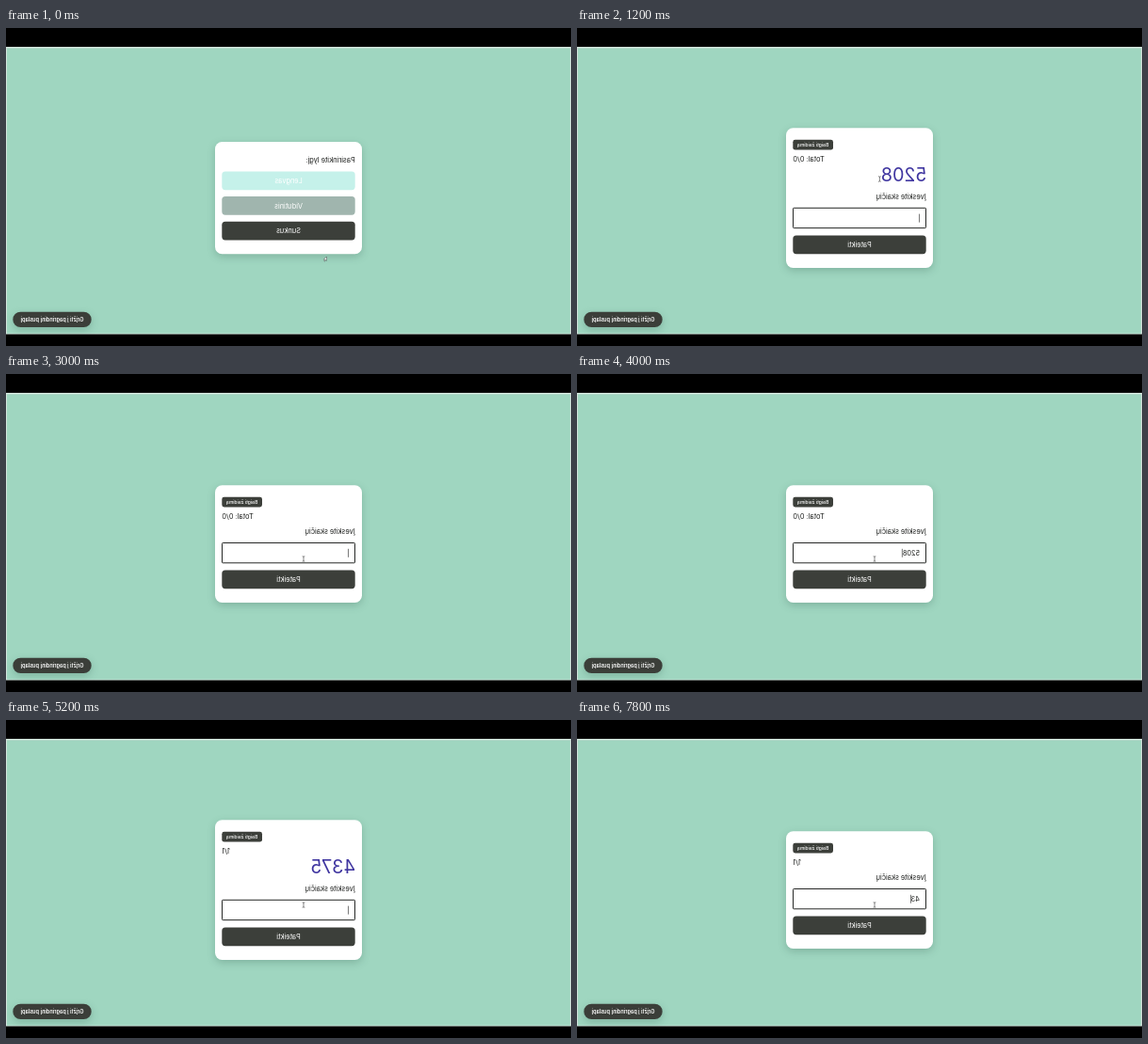
These frames come from a looping animation (600 by 338 pixels, 8 s). An HTML page:

```html
<!DOCTYPE html>
<html lang="lt">
<head>
<meta charset="utf-8">
<style>
html, body { margin: 0; width: 100%; height: 100%; overflow: hidden; background: #000; }
svg { display: block; width: 100%; height: 100%; }
text { font-family: Inter, Roboto, sans-serif; white-space: pre; }
.soft { filter: drop-shadow(0 3px 4px rgba(20, 60, 45, .22)); }
</style>
</head>
<body>
<svg viewBox="0 0 600 338">
  <rect width="600" height="338"/>
  <rect y="20" width="600" height="305.5" fill="#d3e5dd"/>
  <rect x="1" y="21.5" width="598" height="303.2" fill="#9fd6c0"/>
  <!-- the whole page is seen mirrored -->
  <g transform="translate(600 0) scale(-1 1)">
    <g class="soft"><rect x="509.3" y="301.7" width="83.4" height="16.4" rx="8.2" fill="#3b3e39"/></g>
    <text x="551" y="312" font-size="5.6" font-weight="600" fill="#fff" text-anchor="middle">Grįžti į pagrindinį puslapį</text>
    <g id="card"></g>
    <g id="cursor"></g>
  </g>
</svg>
<script>
const LOOP = 8000, STEP = 200;
const DARK = '#3c3f3a', INK = '#1c1e1c', LEFT = 229.3, WIDE = 141.4;
const cardEl = document.getElementById('card');
const cursorEl = document.getElementById('cursor');

const rect = (x, y, w, h, r, fill, extra = '') =>
  `<rect x="${x}" y="${y}" width="${w}" height="${h}" rx="${r}" fill="${fill}" ${extra}/>`;

const text = (x, y, str, o = {}) =>
  `<text x="${x}" y="${y}" font-size="${o.size || 7.4}" font-weight="${o.weight || 400}" ` +
  `fill="${o.fill || INK}" text-anchor="${o.anchor || 'start'}">${str}</text>`;

const panel = (top, bottom) =>
  `<g class="soft">${rect(222, top, 156, bottom - top, 7.5, '#fff')}</g>`;

const ring = y => rect(LEFT - .9, y - .9, WIDE + 1.8, 21.5, 4, 'none', 'stroke="#fff" stroke-width="1"') +
  rect(LEFT - 1.5, y - 1.5, WIDE + 3, 22.7, 4.5, 'none', 'stroke="#8fa39c" stroke-width=".7"');

const button = (y, label, fill = DARK) =>
  rect(LEFT, y, WIDE, 19.7, 3.6, fill) +
  text(300, y + 12.5, label, { fill: '#fff', anchor: 'middle' });

function mix(a, b, k) {
  return `rgb(${a.map((v, i) => Math.round(v + (b[i] - v) * k))})`;
}

function levels(t) {
  const hover = Math.min(1, Math.max(0, (t - 400) / 400));
  return panel(121, 240.3) +
    text(LEFT, 143, 'Pasirinkite lygį:') +
    button(152.5, 'Lengvas', mix([197, 241, 234], [172, 209, 200], hover)) +
    (t >= 1000 ? ring(152.5) : '') +
    button(179, 'Vidutinis', '#a0b5ae') +
    button(205.7, 'Sunkus');
}

const header = (y, score) =>
  rect(328, y, 42.7, 10.8, 2.4, DARK) +
  text(349.4, y + 7.2, 'Baigti žaidimą', { size: 5, weight: 500, fill: '#fff', anchor: 'middle' }) +
  text(370.6, y + 23, score, { anchor: 'end' });

function field(y, value, focus, caret) {
  const w = value.length * 4.62;
  return text(LEFT, y - 9, 'Įveskite skaičių') +
    rect(LEFT + .2, y + .3, WIDE - .4, 21.3, .8, '#fff',
      focus ? 'stroke="#262826" stroke-width="1"' : 'stroke="#a3a3ae" stroke-width=".8"') +
    text(236, y + 13.6, value) +
    (caret ? rect(236 + w, y + 6.6, .6, 9, 0, '#222') : '');
}

const memorize = (score, number, caret) =>
  panel(106.3, 255) + header(118.8, score) +
  text(LEFT - .6, 162.8, number, { size: 19.8, fill: '#3f35a0' }) +
  field(191, '', true, caret) + button(220.5, 'Pateikti');

const recall = (score, value, caret) =>
  panel(118.2, 243) + header(130.7, score) +
  field(179.2, value, true, caret) + button(208.5, 'Pateikti');

const result = () =>
  panel(109.8, 251.3) + header(122.2, '1/1') +
  field(170.7, '5208', false, false) +
  text(LEFT, 207.6, 'Correct!', { weight: 700, fill: '#bdeee3' }) +
  ring(217) + button(217, 'Kitas');

const blink = (t, start) => Math.floor((t - start) / 500) % 2 === 0;
const typed = (t, start, str) =>
  str.slice(0, Math.max(0, Math.floor((t - start) / STEP) + 1));

function scene(t) {
  if (t < 1200) return levels(t);
  if (t < 3000) return memorize('Total: 0/0', '5208', blink(t, 1100));
  if (t < 4400) return recall('Total: 0/0', typed(t, 3400, '5208'), true);
  if (t < 5000) return result();
  if (t < 7000) return memorize('1/1', '4375', blink(t, 5000));
  return recall('1/1', typed(t, 7600, '4375'), true);
}

const ease = k => { k = Math.min(1, Math.max(0, k)); return k * k * (3 - 2 * k); };

function cursor(t) {
  const up = ease(t / 800), down = ease((t - 1200) / 1000);
  const x = 260 + 18.6 * up + 5.4 * down;
  const y = 243.5 - 83 * up + 36 * down;
  const arrow = t < 600 || (t >= 4400 && t < 5000);
  const shape = arrow
    ? '<path d="M-.6-3.6V2.1L.8.9 1.8 3.1 2.8 2.6 1.9.5H3.5Z" transform="translate(0 3)" fill="#fff" stroke="#333" stroke-width=".6"/>'
    : '<path d="M-1.3-2.8Q0-2.8 0-2V2Q0 2.8-1.3 2.8M1.3-2.8Q0-2.8 0-2M0 2Q0 2.8 1.3 2.8" fill="none" stroke="#333" stroke-width=".6"/>';
  const size = t < 600 ? .75 : 1;
  return `<g transform="translate(${x} ${y}) scale(${size})">${shape}</g>`;
}

let shown = -1;
function draw(now) {
  const t = Math.floor((now % LOOP) / STEP) * STEP;
  if (t !== shown) {
    shown = t;
    cardEl.innerHTML = scene(t);
    cursorEl.innerHTML = cursor(t);
  }
  requestAnimationFrame(draw);
}
draw(performance.now());
</script>
</body>
</html>
```
